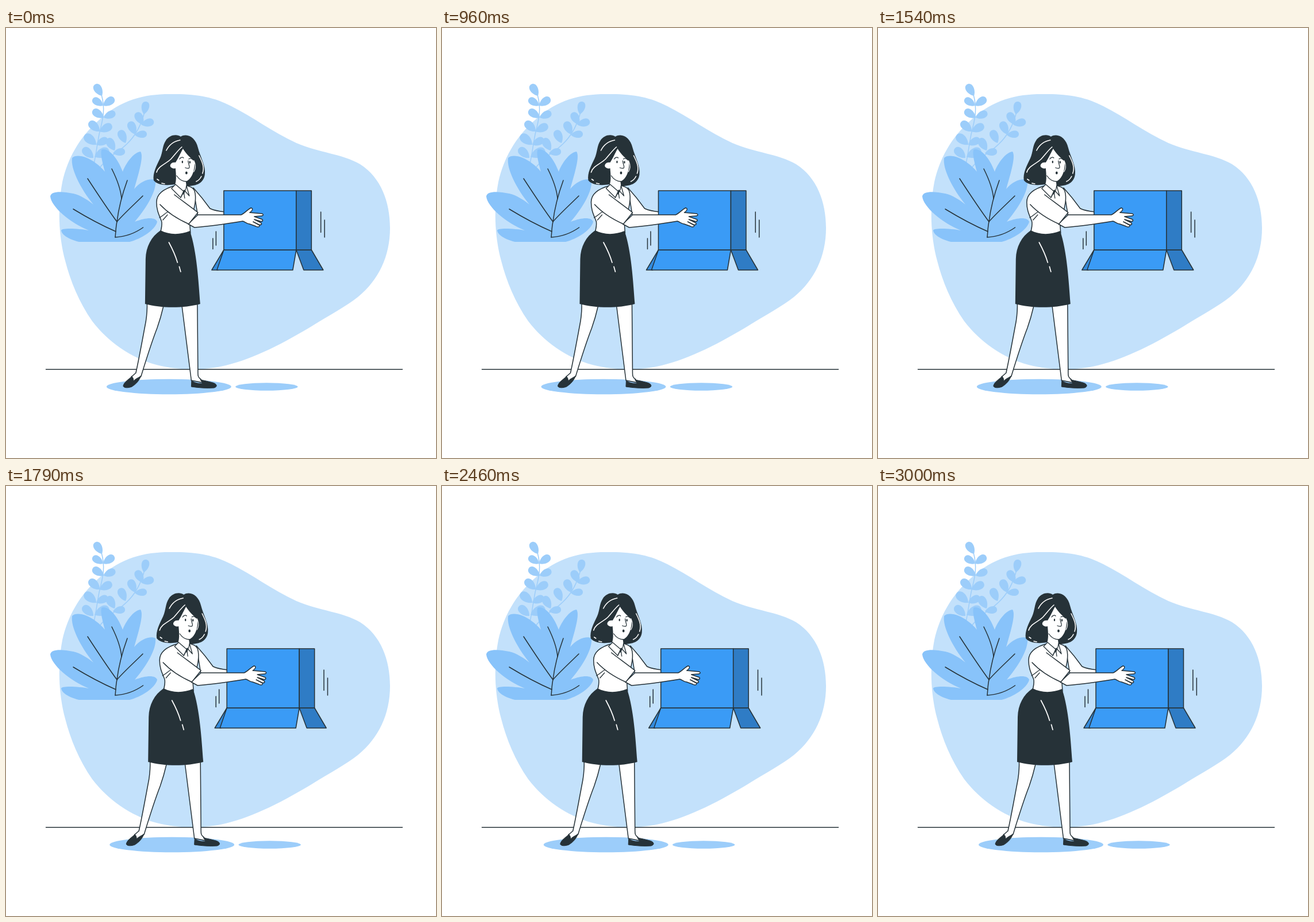
Animation of 748 by 748 pixels, one loop 3.04 s. Source, as an HTML page with a canvas:

```html
<!DOCTYPE html>
<html lang="en">
<head>
<meta charset="utf-8">
<title>Empty box</title>
<style>
html, body { margin: 0; width: 100%; height: 100%; overflow: hidden; background: #fff; }
canvas { display: block; width: 748px; height: 748px; }
</style>
</head>
<body>
<canvas id="stage"></canvas>
<script>
const SIZE = 748, LOOP = 3040, FPS = 24, LEAD = 28, CYCLE = 3000;
const UNIT = SIZE / 500;
const INK = '#263238', WHITE = '#fff', BLOB = '#c3e1fb', LEAF = '#88c3fa',
      PALE = '#9ccdfa', BLUE = '#3a9bf6', MID = '#348bdc', DEEP = '#2f7cc5';
// sideways shake, one value for each tenth of the cycle
const SHAKE = [0, -1, 2, -4, 4, -4, 4, -4, 2, -1, 0];

const canvas = document.getElementById('stage');
const ctx = canvas.getContext('2d');
const dpr = window.devicePixelRatio || 1;
canvas.width = canvas.height = SIZE * dpr;

function draw(d, fill, stroke, width = 1.5) {
  const p = new Path2D(d);
  if (fill) { ctx.fillStyle = fill; ctx.fill(p); }
  if (stroke) { ctx.strokeStyle = stroke; ctx.lineWidth = width; ctx.stroke(p); }
}
const line = (d, color = INK, width = 1.5) => draw(d, null, color, width);

function oval(x, y, rx, ry, color) {
  ctx.fillStyle = color;
  ctx.beginPath();
  ctx.ellipse(x, y, rx, ry, 0, 0, Math.PI * 2);
  ctx.fill();
}

// teardrop from its base to its round tip
function leaf(bx, by, tx, ty) {
  const len = Math.hypot(tx - bx, ty - by), w = len * 0.4;
  ctx.save();
  ctx.translate(bx, by);
  ctx.rotate(Math.atan2(ty - by, tx - bx));
  ctx.beginPath();
  ctx.moveTo(0, 0);
  ctx.bezierCurveTo(len * .35, -w, len, -w, len, 0);
  ctx.bezierCurveTo(len, w, len * .35, w, 0, 0);
  ctx.fillStyle = PALE;
  ctx.fill();
  ctx.restore();
}

function drawPlants() {
  line('M150 250 C156 225 157 212 162 185 C169 158 173 140 166 116', PALE);
  line('M158 250 C175 224 195 217 210 202 C226 187 235 170 241 146', PALE);
  [[167, 118, 155, 98], [169, 135, 151, 123], [169, 135, 188, 122],
   [170, 156, 151, 143], [170, 156, 190, 147], [163, 180, 145, 163],
   [163, 180, 184, 169], [157, 203, 137, 186], [157, 203, 177, 193],
   [152, 226, 134, 209], [154, 224, 179, 212]].forEach(a => leaf(...a));
  [[240, 150, 244, 128], [238, 168, 227, 147], [235, 168, 257, 162],
   [225, 185, 215, 163], [224, 186, 245, 184], [208, 200, 198, 178],
   [189, 213, 177, 192], [186, 218, 207, 214]].forEach(a => leaf(...a));

  draw(`M127 372 C110 368 97 360 96 352 C97 347 128 349 144 352
    C110 338 79 311 77 293 C78 283 98 284 117 288 C130 291 142 299 152 307
    C130 280 112 245 115 226 C122 219 141 223 156 235 C162 239 168 245 172 250
    C168 235 164 220 166 212 C174 207 192 220 203 250
    C208 236 222 216 234 215 C240 223 231 252 223 280
    C235 265 253 260 260 265 C262 283 246 311 224 337
    C245 329 260 329 263 337 C260 351 235 367 215 372Z`, LEAF);
  line('M117 315 C140 329 168 344 191 354');
  line('M142 262 C157 285 176 314 193 337');
  line('M184 245 C194 265 200 284 201 297');
  line('M211 265 C203 287 196 312 193 337 C191 346 191 355 190 364');
  line('M238 292 C222 308 206 322 193 337');
  line('M238.500 347 C223 358 208 363 190 364');
}

function drawScene() {
  draw(`M285 115 C330 114 362 120 392 136 C430 155 462 180 505 200
    C545 217 585 219 616 237 C652 260 668 302 668 348
    C668 396 649 438 612 468 C592 484 562 500 533 518
    C485 547 432 575 382 587 C345 596 300 596 262 586
    C215 573 177 545 150 510 C127 477 112 440 103 405
    C91 360 90 310 98 268 C107 228 127 190 163 159
    C200 125 240 115 285 115Z`, BLOB);
  drawPlants();
  line('M69.500 593.700H689.500');
}

function drawLegs() {
  draw(`M245.500 478 C246 490 245 500 243.500 510 C236 550 231 578 226 600
    L218 607 L222 616 L235 606 C246 570 256 540 263 522
    C268 508 271 497 274 484`, WHITE, INK);
  draw('M306 482 L322.500 613 L343 617 L339 611 C334 608 334 604 334 600 L333 478', WHITE, INK);
  draw(`M219 606 C214 611 205 616 204 623 C206 627 214 626 219 624
    C227 619 232 613 235 605 C230 609 227 609 222 614 C222 610 221 608 219 606Z`, INK, INK, 1);
  draw(`M323 613 L322.500 624 C335 626 350 627 362 626 C369 624 367 619 360 617
    C352 615 345 613 338 612 C340 614 341 616 342 618
    C334 619 327 617 323 613Z`, INK, INK, 1);
}

function drawBox() {
  draw('M379 386 L358 421 H369Z', MID, INK);
  draw('M379 386 L367 421 H499 L505 386Z', BLUE, INK);
  draw('M505 386 L518 421 H552 L531.500 386Z', DEEP, INK);
  draw('M379 283 H505 V386 H379Z', BLUE, INK);
  draw('M505 283 H531.500 V386 H505Z', DEEP, INK);
  line('M360 366V384.500 M365.500 354V378 M547.800 320V355.500 M554.300 334V364');
}

function drawTorso() {
  draw(`M295 274 C276 279 262 287 262 303 C262 318 267 326 271 337
    C272 345 270 351 268 358 C286 362 304 361 321 357
    L320 343 C323 325 334 302 328 283 C325 277 320 276 314 274Z`, WHITE, INK);
  draw(`M269 352 C253 363 243.500 380 243 402 L242 480
    C270 487.500 308 488 338 480 C335 440 332 388 320 353
    C303 360 284 360 269 352Z`, INK);
  line('M283.500 373 C290 385 295 396 298.500 408 M301.500 415 L304 424', WHITE, 1.7);
  line('M267 330 C273 327 277 322 283 319 M273 334 L281 325', INK, 1.3);
}

function drawHead() {
  draw(`M304 189 C297 184 284 186 278 196 C272 205 273 216 268 227
    C262 240 255 252 257 265 C262 272 276 275 294 272
    L315 275 C333 275 344 269 346 255 C348 240 338 224 334 208
    C330 191 316 182 304 189Z`, INK);
  draw(`M308 210 C303 219 299 228 295 234 C289 233 285 237 286 241
    C288 244 292 245 295 244 C296 255 297 265 294 273
    L304 289 L314 276 L313 267 C323 263 329 249 328 231
    C319 225 313 218 308 210Z`, WHITE);
  line('M297 257 C301 263 307 267 314 267', INK, 1.3);
  line('M279 213 C284 203 292 197 303 195', WHITE, 1.6);
  line('M262 251 C265 240 279 236 287 228 C295 219 300 212 306 207', WHITE, 1.6);
  line('M263 263 L266 265 M271 270 L276 271', WHITE, 1.6);
  line('M336 222 C341 232 346 242 342 253 M331 267 C336 265 338 262 340 258', WHITE, 1.6);
  line('M328 233 C330 238 330 245 327 250', WHITE, 1.2);
  line('M302 228 C304 225 307 224 309 226 M318 228 C321 226 324 227 326 230', INK, 1.3);
  oval(307, 233, 1.2, 2.2, INK);
  oval(320, 233.5, 1.2, 2.2, INK);
  line('M317 231 C317 236 320 240 319 243 C318 245 314 244 312 243', INK, 1.3);
  oval(314, 252, 1.9, 2.5, INK);

  draw('M295 272 L288 279 L304 295 L309 284Z', WHITE, INK, 1.3);
  draw('M314 274 L319 292 L310 282 L309 289 L313 280Z', WHITE, INK, 1.3);
  line('M309 283 L311 296 M304 295 L309 286', INK, 1.3);
}

function drawFarArm() {
  draw('M326 278 C336 289 345 300 355 314 C363 318 371 319 382 320 V328 H334Z', WHITE, INK);
}

function drawNearArm() {
  draw(`M334 325 L409 325 C416 322 420 316 426 313 C430 313 430 317 424 321
    L446 323 C449 325 447 327 443 327 L432 328 L446 333
    C448 336 445 337 442 336 L432 333 L444 339
    C446 342 443 343 440 342 L430 337 L441 343 C442 346 438 347 435 345
    L424 341 C418 340 416 337 412 336 C388 340 354 345 328 347 L317 341Z`, WHITE, INK);
  draw('M293 290 C306 300 320 310 334 321 L318 341 C300 333 281 321 268 307', WHITE);
  line('M293 290 C306 300 320 310 334 321 L318 341 C300 333 281 321 268 307');
}

function drawGroup() {
  oval(283.5, 624, 108.5, 13.2, PALE);
  oval(453.5, 624, 54.2, 6.8, PALE);
  drawLegs();
  drawFarArm();
  drawBox();
  drawTorso();
  drawHead();
  drawNearArm();
}

function shift(ms) {
  const frame = Math.floor((ms + 5) * FPS / 1000);
  const t = Math.min(frame * 1000 / FPS + LEAD, CYCLE) / CYCLE * 10;
  const i = Math.min(Math.floor(t), 9);
  return UNIT * (SHAKE[i] + (SHAKE[i + 1] - SHAKE[i]) * (t - i));
}

let start;
function tick(now) {
  start ??= now;
  ctx.setTransform(dpr, 0, 0, dpr, 0, 0);
  ctx.fillStyle = WHITE;
  ctx.fillRect(0, 0, SIZE, SIZE);
  ctx.lineCap = ctx.lineJoin = 'round';
  drawScene();
  ctx.translate(shift((now - start) % LOOP), 0);
  drawGroup();
  requestAnimationFrame(tick);
}
requestAnimationFrame(tick);
</script>
</body>
</html>
```
